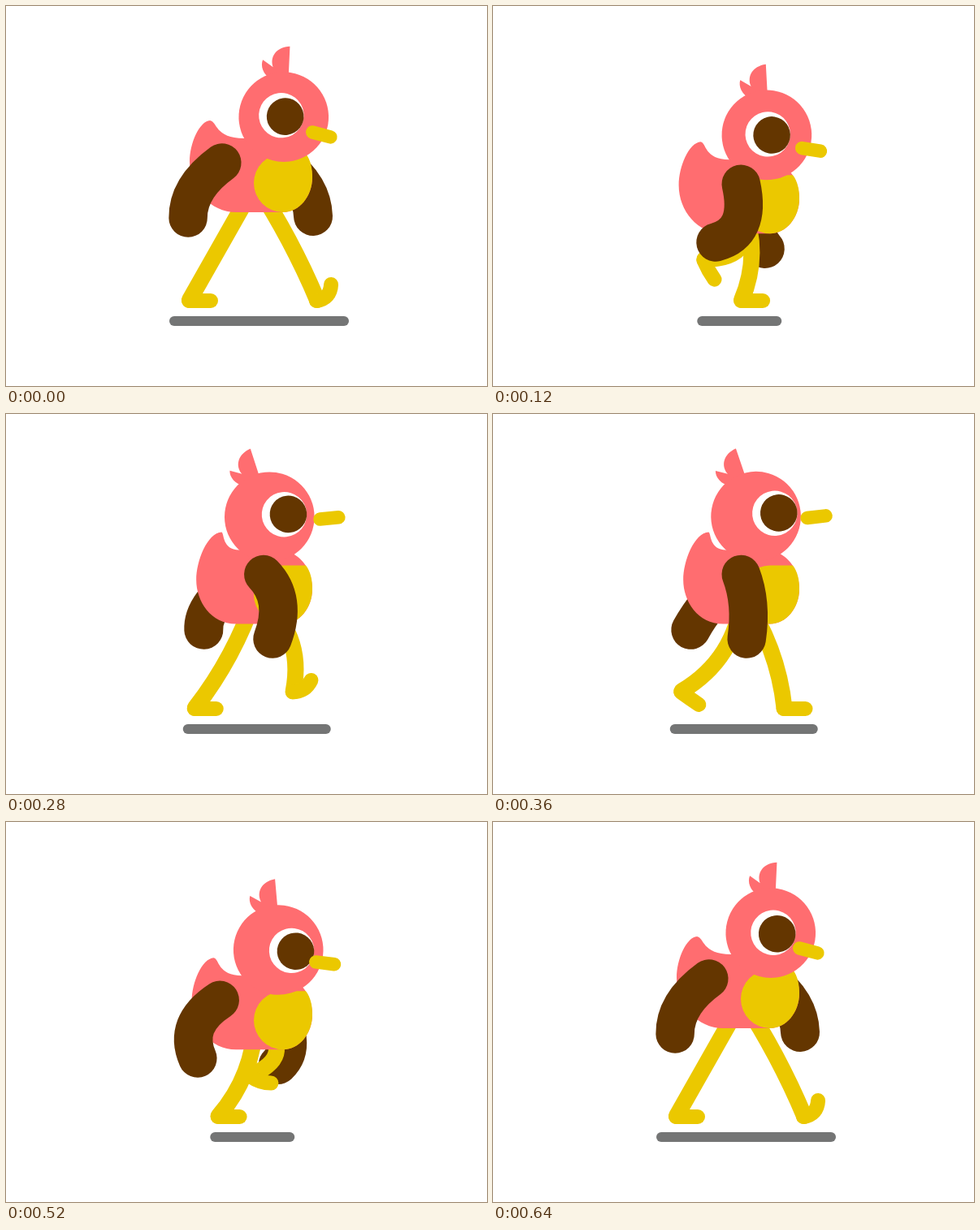
An HTML page with a canvas that plays this animation: 592x468 px, repeating every 680 ms.

```html
<!DOCTYPE html>
<html>
<head>
<meta charset="utf-8">
<style>
html, body { margin: 0; width: 100%; height: 100%; overflow: hidden; background: #fff; }
canvas { display: block; }
</style>
</head>
<body>
<canvas id="stage" width="592" height="468"></canvas>
<script>
const ctx = document.getElementById('stage').getContext('2d');
const PINK = '#ff6d70', BROWN = '#643600', YELLOW = '#ebc800', GREY = '#747575';
const STEP = 40, STEPS = 17, CYCLE = 16, HALF = CYCLE / 2;

// Cosine with one period per walk cycle
const wave = t => Math.cos(2 * Math.PI * t / CYCLE);

function curve(color, width, x0, y0, cx, cy, x1, y1) {
  ctx.strokeStyle = color;
  ctx.lineWidth = width;
  ctx.beginPath();
  ctx.moveTo(x0, y0);
  ctx.quadraticCurveTo(cx, cy, x1, y1);
  ctx.stroke();
}

function line(color, width, x0, y0, x1, y1) {
  curve(color, width, x0, y0, (x0 + x1) / 2, (y0 + y1) / 2, x1, y1);
}

function disc(color, x, y, r) {
  ctx.fillStyle = color;
  ctx.beginPath();
  ctx.arc(x, y, r, 0, 7);
  ctx.fill();
}

function shape(color, d) {
  ctx.fillStyle = color;
  ctx.fill(new Path2D(d));
}

// First half of the cycle: foot on the ground sliding back; second half: swinging forward
function stride(t) {
  const s = t % CYCLE, u = s % HALF / HALF;
  const lift = Math.sin(Math.PI * u), flex = Math.sqrt(lift);
  if (s < HALF) {
    const curl = Math.max(0, 1 - s);
    return {
      x: 382 - 157 * (u + 0.8 * u ** 1.5 * (1 - u)), y: 363,
      bend: 20 * flex + 8 * (1 - u), curl, angle: -48 * curl
    };
  }
  const curl = u * u;
  return {
    x: 225 + 157 * u ** 1.55, y: 363 - 54 * lift,
    bend: 55 * flex + 8 * u, curl,
    angle: 68 * Math.sin(Math.PI * u ** 0.65) ** 2 - 48 * curl
  };
}

function leg(t, belly) {
  const { x, y, bend, curl, angle } = stride(t);
  const hipX = 307, hipY = belly - 35;
  const dx = x - hipX, dy = y - hipY, k = bend / Math.hypot(dx, dy);
  curve(YELLOW, 20, hipX, hipY, hipX + dx / 2 + k * dy, hipY + dy / 2 - k * dx, x + 1, y - 1);
  ctx.save();
  ctx.translate(x, y);
  ctx.rotate(angle * Math.PI / 180);
  curve(YELLOW, 18, 0, 0, 13.5, 11 * curl, 27, 0);
  ctx.restore();
}

function farWing(t, belly) {
  const bob = wave(2 * t);
  curve(BROWN, 48,
    318 + 20 * wave(t), belly - 61,
    312 + 70 * wave(t + 1), belly - 17 - 15 * bob,
    308 + 70 * wave(t), belly + 13 - 8 * bob);
}

function nearWing(t, belly) {
  const snap = Math.sin(Math.PI / 2 * wave(t + 2));
  curve(BROWN, 47.5,
    290 - 27 * snap, belly - 61,
    282 - 65 * snap, belly - 22 + 10 * wave(t - 4) - 12 * wave(2 * t + 2),
    274 - 54 * wave(t + 1), belly + 13 - 6 * wave(t));
}

function body(lean, belly) {
  const mix = (a, b) => a + (b - a) * lean;
  const left = mix(226, 234.5), side = mix(-62, -54), tip = mix(251, 266);
  ctx.save();
  ctx.translate(0, belly);
  shape(PINK, `M341 0H283C252 0 ${left} -28 ${left} ${side}
    C${left} ${side - 23} ${mix(238, 248)} -112 ${tip} -113
    C${mix(260, 269)} -112 ${mix(257, 266)} -91 ${mix(293, 287)} -91
    L350 -88C368 -80 377 -62 377 -43C377 -20 361 0 341 0Z`);
  shape(YELLOW, 'M341 -72H369C375 -64 377 -54 377 -43C377 -20 361 0 341 0A36 36 0 0 1 341 -72Z');
  ctx.restore();
}

function head(swing, belly, eye) {
  ctx.save();
  ctx.translate(332.5 + 9.3 * swing, belly - 125 + 7.7 * swing);
  ctx.rotate((4 + 11 * swing) * Math.PI / 180);
  shape(PINK, 'M-5 -40L-15 -86C-31 -81 -36 -67 -28.5 -56L-43 -61.5C-44 -54 -39 -44 -25 -40Z');
  disc(PINK, 0, 0, 55.3);
  disc('#fff', eye, -1.2, 27.7);
  disc(BROWN, eye + 5, -1, 22.8);
  const beak = 51 - 12 * swing;
  line(YELLOW, 16.5, beak, 9, beak + 23, 9);
  ctx.restore();
}

function draw(t) {
  const belly = 254 + 15.4 * (1 - wave(2 * t));
  const near = Math.min(t % HALF, HALF - t % HALF);
  // The eye drifts slightly slower than the walk and jumps back at the loop
  const eye = 10.2 - 13.7 * Math.cos(0.34 * (t - 0.5));
  ctx.fillStyle = '#fff';
  ctx.fillRect(0, 0, 592, 468);
  line(GREY, 12, 207 + 16.75 * near, 388, 416 - 22.25 * near, 388);
  farWing(t, belly);
  leg(t, belly);
  leg(t + HALF, belly);
  body((1 - wave(t)) / 2, belly);
  head(wave(t - 0.25), belly, eye);
  nearWing(t, belly);
}

function tick() {
  draw(Math.floor(performance.now() / STEP) % STEPS);
  requestAnimationFrame(tick);
}

ctx.lineCap = 'round';
tick();
</script>
</body>
</html>
```
